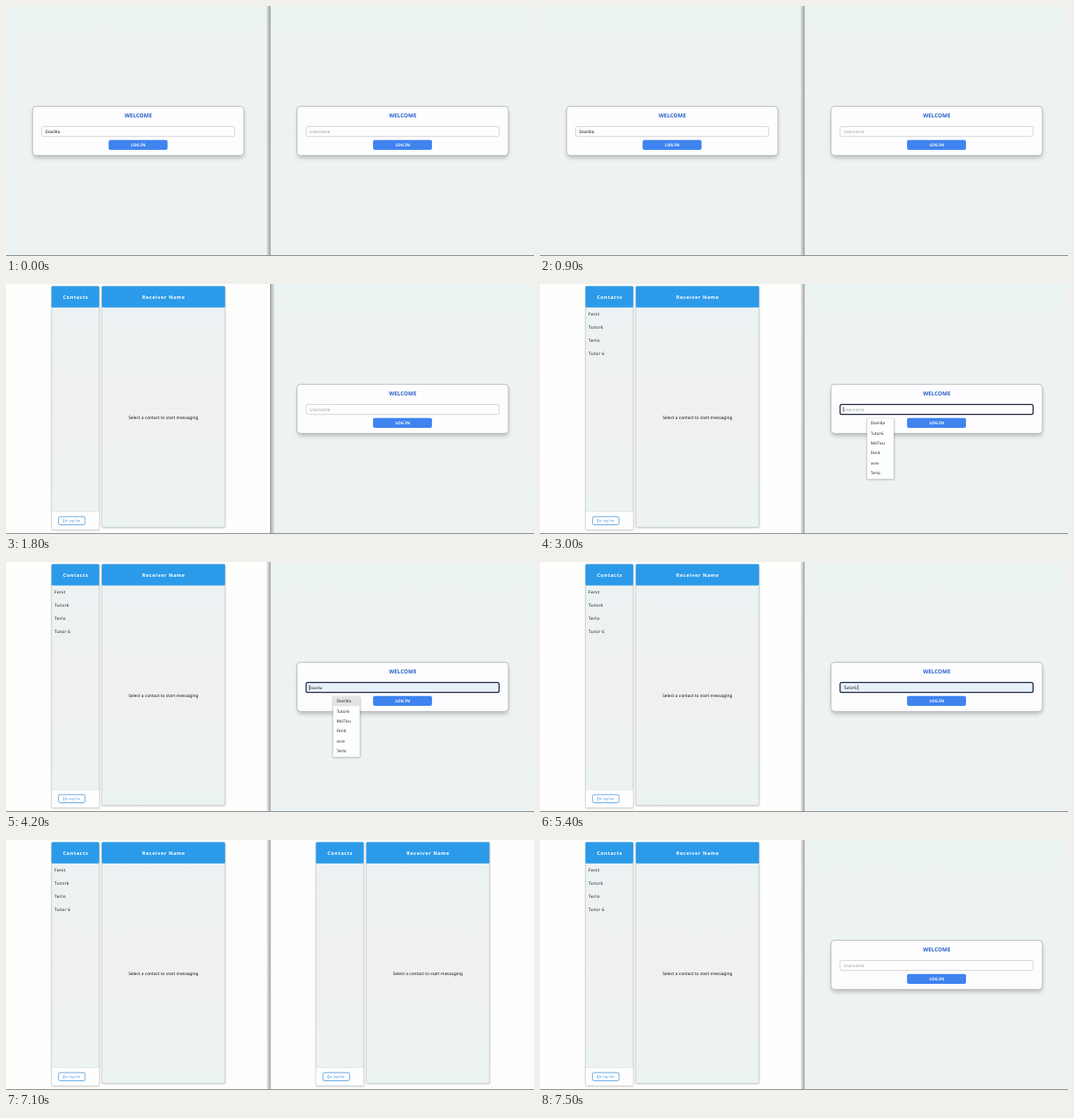
An HTML page for the animation above (8000 ms loop, 600 px wide and 285 px high).

```html
<!DOCTYPE html>
<html lang="en">
<head>
<meta charset="utf-8">
<title>Two chat windows</title>
<style>
  html, body { margin: 0; width: 100%; height: 100%; overflow: hidden; background: #eef3f3; }
  svg { display: block; width: 600px; height: 285px; }
  text { font-family: "Noto Sans", "Open Sans", sans-serif; text-rendering: geometricPrecision; white-space: pre; }
</style>
</head>
<body>
<svg id="stage" viewBox="0 0 600 285" xmlns="http://www.w3.org/2000/svg">
  <defs>
    <linearGradient id="page" x1="0" y1="0" x2="0" y2="1">
      <stop offset="0" stop-color="#ecf3f3"/><stop offset=".5" stop-color="#eef2f2"/><stop offset="1" stop-color="#edf3f3"/>
    </linearGradient>
    <linearGradient id="panel" x1="0" y1="0" x2="0" y2="1">
      <stop offset="0" stop-color="#ebf3f4"/><stop offset=".5" stop-color="#f0f0f0"/><stop offset="1" stop-color="#ecf3f3"/>
    </linearGradient>
    <linearGradient id="shadeL">
      <stop offset="0" stop-color="#555" stop-opacity="0"/><stop offset="1" stop-color="#555" stop-opacity=".5"/>
    </linearGradient>
    <linearGradient id="shadeR">
      <stop offset="0" stop-color="#555" stop-opacity=".42"/><stop offset="1" stop-color="#555" stop-opacity="0"/>
    </linearGradient>
    <filter id="soft" x="-20%" y="-30%" width="140%" height="170%"><feGaussianBlur stdDeviation="2.4"/></filter>
    <filter id="thin" x="-20%" y="-20%" width="140%" height="140%"><feGaussianBlur stdDeviation=".9"/></filter>
  </defs>
</svg>
<script>
const LOOP = 8000;
const OFFSET = 300.5;
const USER = "Dovilita", GUEST = "Tutor6";
const CONTACTS = ["Fenit", GUEST, "Terlo", "Tutor 6"];
const SAVED = [USER, GUEST, "MoTivu", "Fenit", "vvre", "Terlo"];
const BLUE = [63, 131, 239], BLUE_HOVER = [42, 107, 226];
const stage = document.getElementById("stage");

function add(parent, tag, attrs, content) {
  const node = document.createElementNS("http://www.w3.org/2000/svg", tag);
  set(node, attrs);
  if (content) node.textContent = content;
  parent.appendChild(node);
  return node;
}
function set(node, attrs) {
  for (const key in attrs) node.setAttribute(key, attrs[key]);
}
function show(node, on) {
  node.style.display = on ? "" : "none";
}
function group(parent, x = 0) {
  return add(parent, "g", { transform: `translate(${x} 0)` });
}
function box(parent, x, y, width, height, fill, more) {
  return add(parent, "rect", { x, y, width, height, fill, ...more });
}
function label(parent, x, y, size, fill, content, more) {
  return add(parent, "text", { x, y, "font-size": size, fill, ...more }, content);
}
const bold = { "font-weight": 700, "text-anchor": "middle" };
const mix = (a, b, k) => `rgb(${a.map((v, i) => Math.round(v + (b[i] - v) * k))})`;
const ramp = (t, start, length) => Math.min(1, Math.max(0, (t - start) / length));
const within = (t, start, end) => t >= start && t < end;

function makeLogin(x) {
  const root = group(stage, x);
  box(root, -0.5, 0, 300.5, 285, "url(#page)");
  box(root, 31, 118, 239, 55, "#000", { rx: 4, opacity: .24, filter: "url(#soft)" });
  box(root, 30.2, 114.3, 240.2, 56.1, "#fdfcfe", { rx: 4, stroke: "#aeb0b1", "stroke-width": .8 });
  label(root, 150.3, 127.3, 6.25, "#2560c8", "WELCOME", bold);
  const field = box(root, 40.5, 137.4, 219.3, 11.3, "#fff", { rx: 2 });
  const value = label(root, 44.4, 144.7, 4.85, "#111", "");
  const caret = box(root, 44.1, 140, .6, 6.3, "#111");
  const button = box(root, 116.6, 152.8, 67, 11.1, "#3f83ef", { rx: 2 });
  label(root, 150.2, 160.1, 4.7, "#fff", "LOG IN", bold);
  return { root, field, value, caret, button };
}

function makeChat(x, back) {
  const root = group(stage, x);
  box(root, -0.5, 0, 300.5, 285, back);
  const edge = { fill: "none", stroke: "#c6cacb", "stroke-width": .7, rx: 1.5 };
  const column = (left, width, bottom, title) => {
    box(root, left + .3, 4, width, bottom - 3.2, "#000", { opacity: .22, filter: "url(#thin)" });
    box(root, left, 2.6, width, bottom - 2.6, "url(#panel)", { rx: 1.5 });
    box(root, left, 2.6, width, bottom - 2.6, "none", edge);
    box(root, left, 2.6, width, 24.2, "#2b9be9", { rx: 1.2 });
    label(root, left + width / 2 + .3, 16.8, 5.5, "#fff", title, { ...bold, "letter-spacing": .58 });
  };
  column(51.7, 54.2, 280, "Contacts");
  column(108.9, 140, 277.3, "Receiver Name");
  box(root, 52, 259.6, 53.6, 20, "#fefefe");
  box(root, 52, 259.4, 53.6, .5, "#d5dadb");
  const logout = box(root, 59.6, 265.2, 30.3, 9.3, "#fff", { rx: 2, stroke: "#4a98dc", "stroke-width": .8 });
  add(root, "path", {
    d: "M66.6 268.2H65.4V271.6H66.6M66.6 269.9H69M68 268.8L69.1 269.9L68 271",
    fill: "none", stroke: "#3182ce", "stroke-width": .5
  });
  label(root, 71.2, 271.1, 3.4, "#3182ce", "Log Out");
  label(root, 178.8, 154.3, 4.85, "#111", "Select a contact to start messaging", { "text-anchor": "middle" });
  const list = group(root);
  CONTACTS.forEach((name, i) =>
    label(list, 55.1, 36 + i * 15.1, 4.75, "#111", name, { "letter-spacing": .35 }));
  return { root, list, logout };
}

function makeMenu() {
  const root = group(stage);
  box(root, 371.5, 154, 31, 69, "#000", { opacity: .3, filter: "url(#thin)" });
  box(root, 371.7, 153, 30.3, 69.2, "#fdfefe", { stroke: "#d2d5d6", "stroke-width": .4 });
  const mark = box(root, 371.9, 153.2, 29.9, 11.3, "#e3e5e4");
  SAVED.forEach((name, i) => label(root, 375.7, 160.4 + i * 11.3, 4.7, "#222", name));
  return { root, mark };
}

const leftChat = makeChat(0, "#fefefc");
const leftLogin = makeLogin(0);
const rightChat = makeChat(OFFSET, "#fefdfe");
const rightLogin = makeLogin(OFFSET);
const menu = makeMenu();

const leftFront = group(stage), rightFront = group(stage);
box(leftFront, 300.8, 0, 5, 285, "url(#shadeR)");
box(leftFront, 300.1, 0, .8, 285, "#8d9192");
box(rightFront, 295.5, 0, 4.6, 285, "url(#shadeL)");
box(rightFront, 299.9, 0, .8, 285, "#a3a7a8");
box(stage, 0, 284, 600, 1, "#8b8f8f");

function drawLogin(login, s) {
  const fills = { empty: "#fefefe", saved: "#e7effb" };
  set(login.field, {
    fill: s.saved ? fills.saved : fills.empty,
    stroke: s.focus ? "#1c2740" : "#c3c6c9",
    "stroke-width": s.focus ? 1.25 : .7
  });
  login.value.textContent = s.text || "Username";
  set(login.value, {
    fill: s.text ? "#111" : "#9b9fa4",
    "font-size": s.preview ? 4.1 : 4.85
  });
  show(login.caret, s.caret);
  set(login.caret, { x: s.caretX || 44.1 });
  set(login.button, { fill: mix(BLUE, BLUE_HOVER, s.hover) });
}

function draw(t) {
  const leftActive = within(t, 1500, 2900);
  show(leftFront, leftActive);
  show(rightFront, !leftActive);

  show(leftLogin.root, t < 1800);
  show(leftChat.root, t >= 1800);
  show(leftChat.list, t >= 2000);
  drawLogin(leftLogin, { text: USER, hover: ramp(t, 1350, 150) });

  const inChat = within(t, 6300, 7500);
  show(rightChat.root, inChat);
  show(rightLogin.root, !inChat);
  show(rightChat.list, false);
  set(rightChat.logout, { fill: mix([255, 255, 255], [226, 242, 253], ramp(t, 7050, 200)) });

  const preview = within(t, 4100, 5200);
  const chosen = within(t, 5200, 7500);
  const second = t >= 4300;
  drawLogin(rightLogin, {
    text: preview || chosen ? (second ? GUEST : USER) : "",
    saved: preview || chosen,
    preview,
    focus: within(t, 2900, 6100),
    caret: within(t, 2900, 3500) || within(t, 4100, 5800),
    caretX: chosen ? 60.4 : 44.1,
    hover: t < 6300 ? ramp(t, 5750, 150) : 0
  });

  show(menu.root, within(t, 2900, 5200));
  show(menu.mark, preview);
  set(menu.mark, { y: second ? 164.5 : 153.2 });
}

const begin = performance.now();
function frame() {
  draw((performance.now() - begin) % LOOP);
  requestAnimationFrame(frame);
}
draw(0);
requestAnimationFrame(frame);
</script>
</body>
</html>
```
